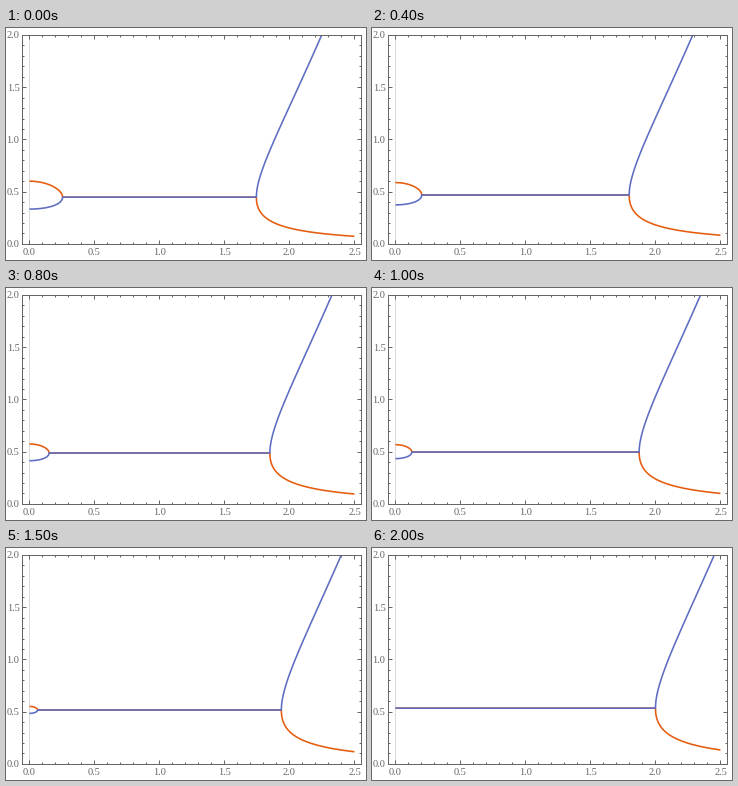
These frames come from a looping animation (360x232 px, 2.1 s). A matplotlib script:

```python
import numpy as np
import matplotlib.pyplot as plt
from matplotlib.animation import FuncAnimation
from matplotlib.ticker import MultipleLocator

W, H, DPI = 360, 232, 72          # at 72 dpi one point is one pixel
FRAMES, STEP_MS = 21, 100
LEFT, RIGHT, TOP, BOTTOM = 16.45, 355.45, 6.9, 215.9
X0, X_UNIT = 23.45, 130

ORANGE = (0.9, 0.36, 0.054)
BLUE = (0.365248, 0.427802, 0.758297)
GRAY = "0.4"

plt.rcParams["font.family"] = "Liberation Serif"
plt.rcParams["path.simplify"] = False
fig = plt.figure(figsize=(W / DPI, H / DPI), dpi=DPI, facecolor="white")
ax = fig.add_axes([LEFT / W, 1 - BOTTOM / H, (RIGHT - LEFT) / W, (BOTTOM - TOP) / H])
ax.set_xlim((LEFT - X0) / X_UNIT, (RIGHT - X0) / X_UNIT)
ax.set_ylim(0, 2)

for axis in (ax.xaxis, ax.yaxis):
    axis.set_major_locator(MultipleLocator(0.5))
    axis.set_minor_locator(MultipleLocator(0.1))
    axis.set_major_formatter("{x:.1f}")
ax.tick_params(which="both", direction="in", top=True, right=True,
               color=GRAY, width=1, labelcolor=GRAY, labelsize=10.3)
ax.tick_params(which="major", length=4)
ax.tick_params(which="minor", length=2.4)
ax.tick_params(axis="x", pad=4.5)
ax.tick_params(axis="y", pad=3)
for spine in ax.spines.values():
    spine.set(color=GRAY, linewidth=1)
ax.axvline(0, color="0.85", lw=1, zorder=1)

style = dict(lw=1.6, solid_capstyle="butt", solid_joinstyle="round", snap=False)
upper, = ax.plot([], [], color=ORANGE, **style)
lower, = ax.plot([], [], color=BLUE, **style)


def moduli(x, a, b):
    """Moduli of the roots of z^2 - (a + b - a x^2) z + a b."""
    trace = a + b - a * x**2
    root = np.sqrt(trace**2 - 4 * a * b + 0j)
    return abs(trace + root) / 2, abs(trace - root) / 2


def draw(i):
    s = i / (FRAMES - 1)
    a = 0.6 - s / 15
    b = 1 / 3 + s / 5
    r = np.sqrt(b / a)
    x = np.sort(np.append(np.linspace(0, 2.5, 1001), [1 - r, 1 + r]))
    big, small = moduli(x, a, b)
    upper.set_data(x, big)
    lower.set_data(x, small)
    return upper, lower


anim = FuncAnimation(fig, draw, frames=FRAMES, interval=STEP_MS,
                     repeat=True, repeat_delay=0, blit=False)
plt.show()
```
